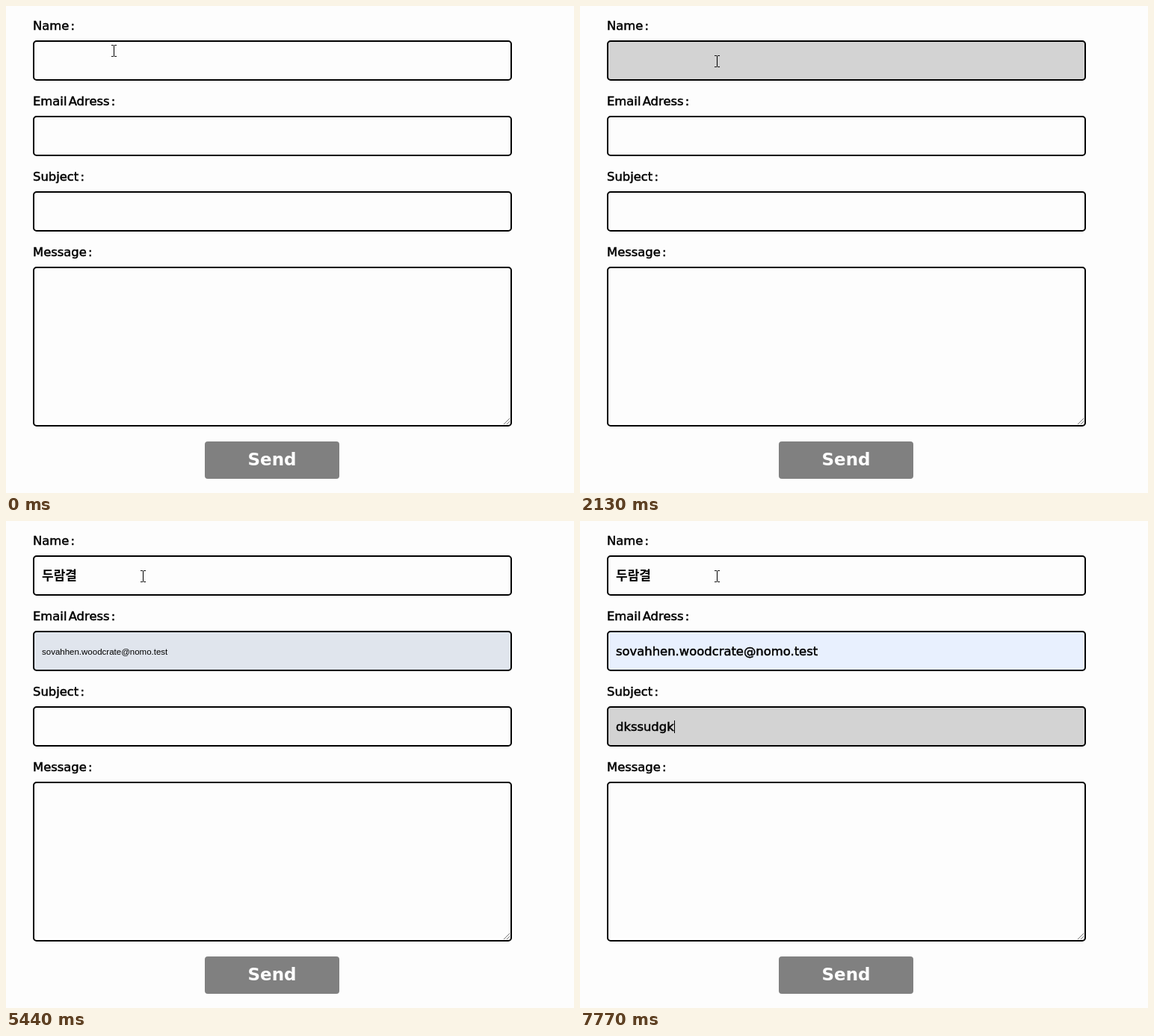
Recreate the animation shown at these times as an HTML page with a canvas. Size 760x652 px, loop 8000 ms.

```html
<!DOCTYPE html>
<html lang="en">
<head>
<meta charset="utf-8">
<title>Contact form</title>
<style>
html, body { margin: 0; width: 100%; height: 100%; overflow: hidden; background: #fdfdfd; }
canvas { display: block; }
</style>
</head>
<body>
<canvas id="stage" width="760" height="652"></canvas>
<script>
const ctx = document.getElementById('stage').getContext('2d');
const LOOP = 8000, FADE = 400;
const INK = '#000';
const PAPER = [253, 253, 253], FOCUS = [211, 211, 211], FILLED = [232, 240, 254];
const TEXT = '16.4px "DejaVu Sans", sans-serif';
const HANGUL = 'bold 17px "Noto Sans CJK KR", "Noto Sans CJK", sans-serif';
const PREVIEW = '11.5px "Liberation Sans", Arial, sans-serif';
const EMAIL = 'sovahhen.woodcrate@nomo.test';

// Each field: background fades [start, colour], text states [start, text, font], caret spans [on, off]
const fields = [
  {
    label: 'Name :', y: 46, h: 54,
    fades: [[1700, FOCUS], [3600, PAPER]],
    keys: [[2530, 'ㄷ'], [2620, '두'], [2710, '둘'], [2800, '두라'], [2890, '두람'],
           [2990, '두람ㄱ'], [3090, '두람겨'], [3180, '두람결']].map(k => [...k, HANGUL]),
    caret: [[1700, 2130], [2530, 3600]]
  },
  {
    label: 'Email Adress :', y: 147, h: 54,
    fades: [[3600, FOCUS], [5300, FILLED]],
    keys: [[4000, 's', TEXT], [4170, 'so', TEXT], [4300, 'sov', TEXT],
           [5300, EMAIL, PREVIEW], [5640, EMAIL, TEXT]],
    caret: [[3600, 4800], [5640, 5840]]
  },
  {
    label: 'Subject :', y: 248, h: 54,
    fades: [[5860, FOCUS]],
    keys: [6600, 6800, 6980, 7140, 7200, 7370, 7570, 7740]
      .map((t, i) => [t, 'dkssudgk'.slice(0, i + 1), TEXT]),
    caret: [[5840, 6340], [6600, LOOP]]
  },
  { label: 'Message :', y: 349, h: 214, fades: [], keys: [], caret: [] }
];

const mouse = [[0, 144, 60], [30, 144, 60], [930, 169, 57], [1260, 169, 57], [1360, 183, 74]];

const clamp = v => Math.min(1, Math.max(0, v));
const mix = (a, b, k) => a + (b - a) * k;

// CSS "ease": cubic-bezier(.25, .1, .25, 1)
function ease(x) {
  if (x <= 0 || x >= 1) return clamp(x);
  let lo = 0, hi = 1, s = 0.5;
  for (let i = 0; i < 20; i++) {
    s = (lo + hi) / 2;
    const px = 0.75 * s * (1 - s) + s * s * s;
    if (px < x) lo = s; else hi = s;
  }
  return 0.3 * s * (1 - s) * (1 - s) + 3 * s * s * (1 - s) + s * s * s;
}

function write(str, x, y, font, color, weight) {
  ctx.font = font;
  ctx.fillStyle = ctx.strokeStyle = color;
  ctx.fillText(str, x, y);
  if (weight) {
    ctx.lineWidth = weight;
    ctx.strokeText(str, x, y);
  }
}

function roundBox(x, y, w, h, r) {
  ctx.beginPath();
  ctx.roundRect(x, y, w, h, r);
}

function background(fades, t) {
  let color = PAPER;
  for (const [start, to] of fades) {
    const k = ease((t - start) / FADE);
    color = color.map((c, i) => mix(c, to[i], k));
  }
  return `rgb(${color.map(Math.round).join(',')})`;
}

function drawField(f, t) {
  write(f.label, 36, f.y - 14, TEXT, INK, 0.5);
  roundBox(37, f.y + 1, 639, f.h - 2, 4);
  ctx.fillStyle = background(f.fades, t);
  ctx.fill();
  ctx.lineWidth = 2;
  ctx.strokeStyle = INK;
  ctx.stroke();

  let end = 48;
  const key = f.keys.filter(k => t >= k[0]).pop();
  if (key) {
    const [, str, font] = key;
    write(str, 48, f.y + (font === PREVIEW ? 32 : 33), font, INK, font === TEXT ? 0.5 : 0);
    end += Math.round(ctx.measureText(str).width);
  }
  if (f.caret.some(([on, off]) => t >= on && t < off)) {
    ctx.fillStyle = INK;
    ctx.fillRect(end, f.y + 19, 1, 17);
  }
}

function drawGrip() {
  ctx.strokeStyle = '#777';
  ctx.lineWidth = 1;
  ctx.beginPath();
  for (const d of [8, 4]) {
    ctx.moveTo(674 - d, 560);
    ctx.lineTo(674, 560 - d);
  }
  ctx.stroke();
}

function drawButton() {
  roundBox(266, 583, 180, 50, 4);
  ctx.fillStyle = '#808080';
  ctx.fill();
  ctx.textAlign = 'center';
  write('Send', 356, 615, 'bold 23px "DejaVu Sans", sans-serif', '#fdfdfd');
  ctx.textAlign = 'left';
}

function drawMouse(t) {
  let i = mouse.length - 1;
  while (mouse[i][0] > t) i--;
  const a = mouse[i], b = mouse[i + 1] || a;
  const k = a === b ? 0 : (t - a[0]) / (b[0] - a[0]);
  const x = Math.round(mix(a[1], b[1], k)), y = Math.round(mix(a[2], b[2], k));
  ctx.fillStyle = INK;
  ctx.fillRect(x, y - 7, 1, 14);
  for (const edge of [y - 8, y + 7]) {
    ctx.fillRect(x - 3, edge, 3, 1);
    ctx.fillRect(x + 1, edge, 3, 1);
  }
}

function draw(t) {
  ctx.fillStyle = '#fdfdfd';
  ctx.fillRect(0, 0, 760, 652);
  ctx.wordSpacing = '-3px';
  for (const f of fields) drawField(f, t);
  drawGrip();
  drawButton();
  drawMouse(t);
}

const began = performance.now();
function tick() {
  draw((performance.now() - began) % LOOP);
  requestAnimationFrame(tick);
}
tick();
</script>
</body>
</html>
```
